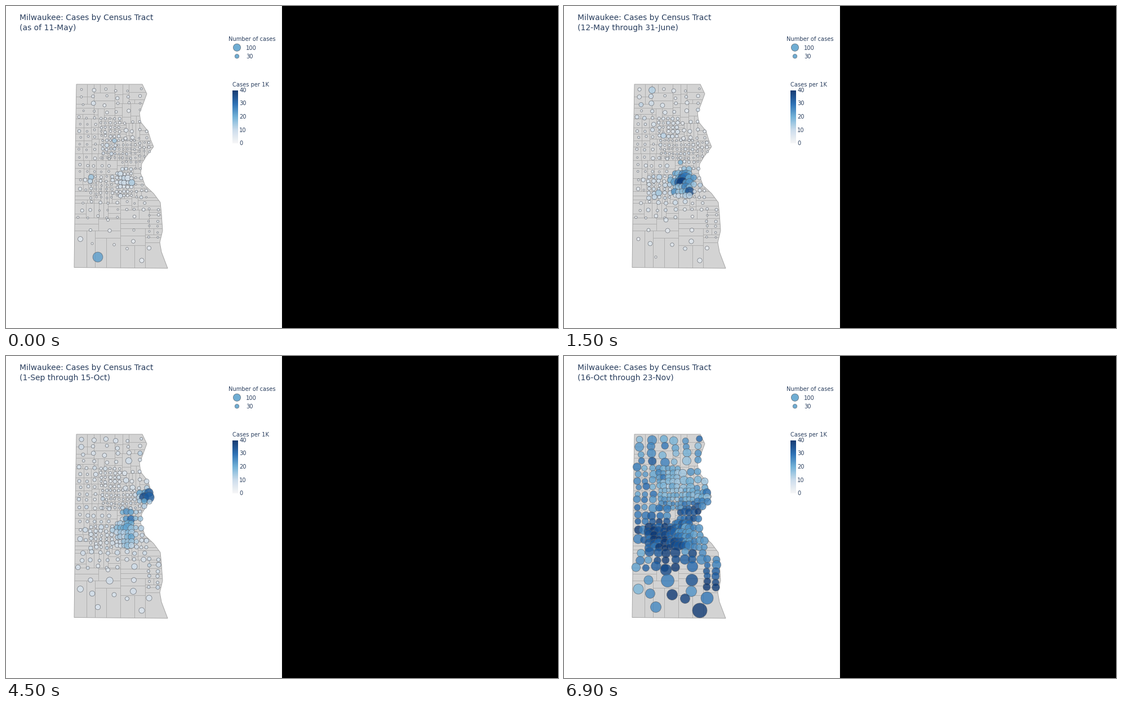
These frames come from a looping animation (980x572 px, 7500 ms). A matplotlib script:

```python
import numpy as np
import matplotlib.pyplot as plt
from matplotlib.animation import FuncAnimation
from matplotlib.collections import LineCollection
from matplotlib.colors import LinearSegmentedColormap
from matplotlib.patches import Polygon, Rectangle
from matplotlib.path import Path

W, H, DPI = 980, 572, 100
PT = 72 / DPI
INK = "#2a3f5f"
EDGE = (0.33, 0.35, 0.38, 0.75)
BLUES = LinearSegmentedColormap.from_list(
    "cases", ["#f6f6f7", "#c9dbeb", "#6baed6", "#2068b0", "#08306b"])

plt.rcParams["font.family"] = "DejaVu Sans"
rng = np.random.default_rng(11)

# straight west side, then the lake shore from north to south
COUNTY = [
    (121, 464.5), (122, 380), (123, 260), (125, 139), (242, 139), (250, 156),
    (243, 175), (237, 190), (239, 206), (252, 222), (257, 238), (262, 250),
    (249, 267), (241, 280), (239, 297), (247, 319), (262, 333), (274, 349),
    (276, 370), (278, 399), (273, 420), (276, 437), (287, 466)]

# x0, x1, columns, y0, y1, rows, radius
BANDS = [
    (136, 238, 6, 149, 187, 4, 6.9),
    (131, 158, 3, 198, 256, 6, 6),
    (169, 201, 5, 200, 231, 5, 5.2),
    (212, 250, 4, 207, 235, 3, 6.5),
    (172, 229, 9, 239, 270, 5, 4.5),
    (238, 254, 3, 243, 266, 4, 6.2),
    (206, 238, 5, 277, 289, 2, 6.2),
    (131, 182, 5, 270, 295, 3, 6.5),
    (132, 141, 2, 310, 326, 2, 7),
    (150, 188, 5, 303, 340, 6, 6.8),
    (197, 223, 5, 298, 337, 6, 7.1),
    (231, 250, 3, 306, 340, 4, 6),
    (135, 245, 8, 349, 363, 2, 7.8),
    (129, 198, 5, 375, 375, 1, 7.5),
    (254, 269, 2, 362, 412, 6, 6.6)]

# x, y, radius
RURAL = [
    (181, 380, 10), (228, 374, 9.5), (150, 398, 8), (184, 399, 11.5),
    (227, 398, 10.5), (132, 414, 9), (153, 422, 8.5), (192, 424, 9.5),
    (226, 418, 9.5), (215, 431, 8.5), (254, 430, 11), (163, 446, 9.5),
    (241, 452, 13)]

# subtitle, base rate, spread, bumps (x, y, sigma, rate)
PERIODS = [
    ("(as of 11-May)", 2.4, 0.35,
     [(208, 308, 14, 7), (188, 245, 12, 5), (168, 168, 8, 12),
      (150, 306, 4, 16), (163, 446, 5, 15)]),
    ("(12-May through 31-June)", 3.6, 0.35,
     [(212, 306, 15, 25), (218, 327, 9, 10), (180, 330, 25, 4),
      (160, 195, 30, 3)]),
    ("(1-July through 31-Aug)", 8.5, 0.2,
     [(207, 310, 16, 9), (218, 332, 10, 9), (240, 266, 13, 8),
      (229, 304, 4, 20), (180, 210, 4, 8)]),
    ("(1-Sep through 15-Oct)", 6.5, 0.2,
     [(249, 249, 8, 33), (213, 307, 17, 10), (218, 331, 8, 9),
      (228, 286, 10, 11), (213, 279, 5, 22), (195, 230, 25, -2)]),
    ("(16-Oct through 23-Nov)", 24, 0.14,
     [(200, 232, 28, -9), (140, 148, 12, -8), (170, 312, 30, 14),
      (190, 368, 20, 12), (248, 445, 30, 12), (258, 395, 18, 9),
      (230, 276, 13, 15), (214, 318, 11, -8)])]


def band(x0, x1, nx, y0, y1, ny, r):
    """Uneven street grid of tracts as rows of x, y, radius."""
    x, y = np.meshgrid(np.linspace(x0, x1, nx), np.linspace(y0, y1, ny))
    wobble = 0.13 * (x1 - x0) / (nx - 1)
    shift = rng.uniform(-wobble, wobble, (2, x.size))
    size = r * rng.uniform(0.78, 1.2, x.size)
    return np.column_stack([x.ravel() + shift[0], y.ravel() + shift[1], size])


def borders(pts, x0, x1, y0, y1):
    """Halve the box between tracts until each has its own cell."""
    if len(pts) < 2:
        return []
    axis = int(np.ptp(pts[:, 1]) > np.ptp(pts[:, 0]))
    pts = pts[np.argsort(pts[:, axis])]
    mid = len(pts) // 2
    cut = pts[mid - 1:mid + 1, axis].mean()
    low, high = pts[:mid], pts[mid:]
    if axis:
        return ([[(x0, cut), (x1, cut)]] + borders(low, x0, x1, y0, cut)
                + borders(high, x0, x1, cut, y1))
    return ([[(cut, y0), (cut, y1)]] + borders(low, x0, cut, y0, y1)
            + borders(high, cut, x1, y0, y1))


def rates(base, spread, bumps):
    field = np.full(len(X), float(base))
    for cx, cy, s, a in bumps:
        field += a * np.exp(-((X - cx) ** 2 + (Y - cy) ** 2) / (2 * s * s))
    return np.clip(field * np.exp(rng.normal(0, spread, len(X))), 0.3, 39)


def area(r):
    return (2 * np.asarray(r) * PT) ** 2


tracts = np.vstack([band(*b) for b in BANDS] + [RURAL])
tracts = tracts[Path(COUNTY).contains_points(tracts[:, :2])]
X, Y, PEAK = tracts.T
RATES = [rates(*p[1:]) for p in PERIODS]

fig = plt.figure(figsize=(W / DPI, H / DPI), dpi=DPI, facecolor="white")
ax = fig.add_axes([0, 0, 1, 1])


def label(x, y, text, size=9.85):
    return ax.text(x, y, text, size=size * PT, color=INK, va="baseline")


ax.add_patch(Rectangle((490, 0), 490, H, fc="black", lw=0))

county = ax.add_patch(Polygon(COUNTY, fc="#d3d3d3", ec="#a0a0a0",
                              lw=0.9 * PT, zorder=1))
lines = LineCollection(borders(tracts, 121, 287, 139, 466),
                       colors="#a6a6a6", linewidths=0.8 * PT, zorder=2)
ax.add_collection(lines)
lines.set_clip_path(county)

label(24, 24.6, "Milwaukee: Cases by Census Tract", 13.95)
subtitle = label(24, 42.6, "", 13.95)

label(394.5, 62.2, "Number of cases")
label(426, 77.6, "100")
label(426, 93.4, "30")
ax.scatter([410, 410], [73.7, 89.3], s=area([6.6, 3.7]), linewidths=0.8 * PT,
           facecolors="#6fadd3", edgecolors=[EDGE])

label(401.5, 143.2, "Cases per 1K")
TOP, BOTTOM = 150, 244
for tick in range(0, 41, 10):
    label(414, BOTTOM + 3 - tick * (BOTTOM - TOP) / 40, str(tick))
ax.imshow(np.linspace(1, 0, BOTTOM - TOP)[:, None], cmap=BLUES, alpha=0.94,
          extent=(402, 412, BOTTOM, TOP), interpolation="nearest")

dots = ax.scatter(X, Y, s=area(PEAK), linewidths=0.75 * PT,
                  edgecolors=[EDGE], zorder=3)
ax.set(xlim=(0, W), ylim=(H, 0), aspect="auto")
ax.axis("off")


def draw(i):
    subtitle.set_text(PERIODS[i][0])
    # dot area follows the case count: rate times population
    radius = PEAK * np.sqrt(RATES[i] / RATES[-1])
    dots.set_sizes(area(np.clip(radius, 1.5, 13)))
    dots.set_facecolors(BLUES(RATES[i] / 40, alpha=0.77))
    return dots, subtitle


anim = FuncAnimation(fig, draw, frames=len(PERIODS), interval=1500,
                     repeat=True, repeat_delay=0)
plt.show()
```
